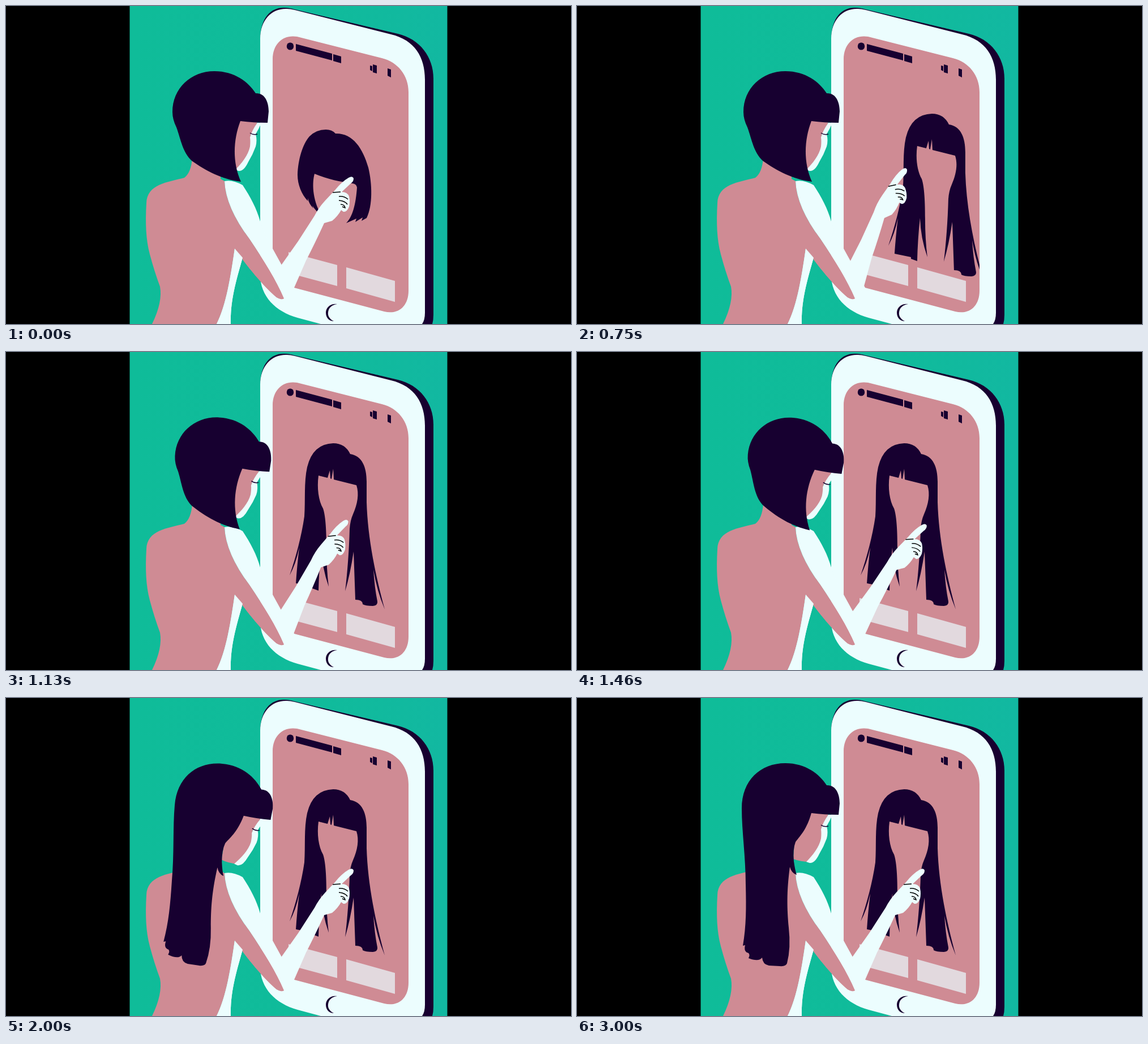
These frames come from a looping animation (998 px wide and 561 px high, 3180 ms). An HTML page with a canvas:

```html
<!DOCTYPE html>
<html lang="en">
<head>
<meta charset="utf-8">
<title>Trying on hair</title>
<style>
html, body { margin: 0; width: 100%; height: 100%; overflow: hidden; background: #000; }
canvas { display: block; }
</style>
</head>
<body>
<canvas id="c" width="998" height="561"></canvas>
<script>
const ctx = document.getElementById('c').getContext('2d');
const LOOP = 3180, FPS = 24;
const INK = '#170030', WHITE = '#ecfdfe', PINK = '#cf8b94', PALE = '#e2d9de';
const P = d => new Path2D(d);

const phoneSide = P(`M449 58 C450 20 468 2 492 3 Q500 3 510 6 L692 49
  C731 58 755 90 755 128 V545 Q755 554 753 561 H700 L449 400Z`);
const phoneFace = P(`M449 58 C449 24 470 4 496 5 Q502 5 510 7 L680 50
  C722 60 740 90 740 130 V541 Q740 554 735 561 H556 L515 550
  C476 539 449 512 449 474Z`);
const screen = P(`M471 94 C471 66 490 50 514 54 L664 92
  C692 99 711 122 711 152 V502 C711 530 693 545 668 539 L509 497
  Q471 486 471 452Z`);
const status = P(`M512 67 L576 84 V96 L512 79Z M578 85 L592 89 V101 L578 97Z
  M643 105 L647 106 V115 L643 113Z M648 103 L655 105 V119 L648 117Z
  M674 110 L680 112 V126 L674 123Z`);
const buttons = P(`M499 434 L585 457 V494 L499 471Z M601 461 L687 485 V522 L601 498Z`);
const home = P(`M585 526 C573 524 565 532 565 541 C565 550 571 556 579 556
  C571 552 568 546 569 540 C570 532 576 527 585 526Z`);

const screenBob = P(`M565 218 Q576 218 582 225 C612 224 630 250 640 285
  C647 314 648 352 637 374 L628 379 L630 373 L617 381 L619 375 L601 383
  C612 372 618 350 620 320 Q619 314 612 313 C590 310 570 306 545 296
  C541 310 540 340 557 369 Q548 363 541 352 L543 357 Q535 349 533 339 V344
  C522 332 515 315 515 298 C516 270 524 244 536 230 Q548 218 565 218Z`);
const screenLong = P(`M578 161 Q599 161 608 180 C629 183 637 203 637 229
  L637 265 C639 330 653 395 669 454 Q655 421 649 384
  Q651 415 656 440 Q657 447 648 448 Q635 448 630 445 Q630 437 617 437
  L614 352 Q608 392 599 422 C603 390 606 350 607 312 Q608 297 613 286
  C621 268 624 250 619 235 L579 225 L578 206 L575 224 L573 223 L572 209
  L568 222 L552 218 C549 240 552 262 560 276 C565 290 566 320 566 346
  Q566 382 570 414 Q558 380 557 345 Q553 382 552 421 L541 417 V414 L512 408
  Q514 378 518 345 Q512 374 501 394 C512 362 522 325 527 290
  C529 262 526 230 532 203 Q542 162 578 161Z`);

const armShade = 'C477 483 456 450 430 411 Q388 355 386 309';
const body = P(`M329 268 Q327 294 315 303 C285 311 249 314 248 348
  C246 382 247 412 254 438 Q262 468 272 495 Q277 522 258 561 H372
  C389 528 397 476 404 428 C425 458 455 495 478 514 Q486 519 491 516
  ${armShade} L379 305 V268Z`);
const side = P('M404 428 L418 444 C406 486 396 520 397 561 H372 C389 528 397 476 404 428Z');
const upperArm = P(`M386 309 Q400 306 418 316 C432 337 443 358 449 380
  Q458 407 471 428 L487 457 L509 497 L491 517 ${armShade}Z`);

const face = P('M414 195 H448 L440 215 L432 228 L433 244 L429 260 L412 289 Q395 289 382 284 L385 240Z');
const profile = P(`M444 206 H451 Q447 216 441 226 Q444 237 441 248
  Q436 262 428 275 Q420 292 411 291 L405 289
  C416 278 428 263 431 248 Q432 238 431 232 Q434 220 444 206Z`);
const lash = P('M431 224 Q437 228 444 226');
const fringe = 'M368 115 C404 115 428 134 441 154 C457 153 464 169 464 186 L462 206 Q437 206 414 203';
const headBob = P(fringe + ` C401 237 400 276 415 310 C382 306 353 291 328 273
  C312 258 309 236 301 214 Q294 200 294 187 C294 145 327 115 368 115Z`);
const headLong = P(fringe + ` C406 231 396 241 386 254 Q381 267 383 288 Q385 303 388 312
  Q379 309 376 298 C370 342 371 372 374 405 Q378 441 371 468 Q369 474 358 473
  L339 472 Q328 470 327 458 Q321 466 303 459 Q306 453 303 450 Q294 448 297 436
  L293 437 C299 402 299 370 298 330 C298 280 291 235 291 195 C291 145 324 115 368 115Z`);

const forearm = P(`M474 476 L487 456 L516 415 L545 370 Q552 356 564 343 L581 325
  Q593 310 605 303 Q612 299 614 304 Q614 310 609 313 L593 328 Q603 328 606 336
  Q608 345 606 354 Q602 364 596 363 L592 360 Q586 371 576 379 Q569 381 562 383
  Q546 418 530 449 L509 497 L492 517Z`);
const knuckles = P(`M577 329 L591 328 M588 336 Q597 335 604 341
  M588 343 Q599 344 603 350 M591 350 Q598 350 599 356 L594 354`);

const fill = (path, color) => { ctx.fillStyle = color; ctx.fill(path); };
const clamp = x => Math.min(1, Math.max(0, x));
const span = (t, a, b) => clamp((t - a) / (b - a));
const sine = x => (1 - Math.cos(Math.PI * x)) / 2;
const quad = x => x < .5 ? 2 * x * x : 1 - 2 * (1 - x) ** 2;
const cubic = x => x < .5 ? 4 * x ** 3 : 1 - 4 * (1 - x) ** 3;

// forearm angle in degrees: [time, angle]
const swing = [[70, 0], [590, 5.5], [785, -9.6], [1130, -2.5], [1460, 1.1], [1640, 4.4], [2000, 0]];

function slope(i) {
  if (i <= 0 || i >= swing.length - 1) return 0;
  const [a, b, c] = [swing[i - 1], swing[i], swing[i + 1]];
  if ((b[1] - a[1]) * (c[1] - b[1]) <= 0) return 0;
  return (c[1] - a[1]) / (c[0] - a[0]);
}

function armAngle(t) {
  const i = swing.findIndex(k => k[0] > t);
  if (i <= 0) return 0;
  const [t0, v0] = swing[i - 1], [t1, v1] = swing[i];
  const d = t1 - t0, u = (t - t0) / d, w = 1 - u;
  return v0 * w * w * (1 + 2 * u) + v1 * u * u * (3 - 2 * u)
    + slope(i - 1) * d * u * w * w - slope(i) * d * u * u * w;
}

function turned(x, y, angle, draw) {
  ctx.save();
  ctx.translate(x, y);
  ctx.rotate(angle);
  ctx.translate(-x, -y);
  draw();
  ctx.restore();
}

function shifted(path, x, y) {
  ctx.save();
  ctx.translate(x, y);
  fill(path, INK);
  ctx.restore();
}

const green = ctx.createLinearGradient(219, 0, 779, 0);
green.addColorStop(0, '#0fbc99');
green.addColorStop(.6, '#10bb9b');
green.addColorStop(1, '#12b8a1');

function drawPhone(t) {
  fill(phoneSide, INK);
  fill(phoneFace, WHITE);
  fill(screen, PINK);
  fill(status, INK);
  ctx.beginPath();
  ctx.ellipse(502, 71, 6.2, 6.6, 0, 0, 7);
  ctx.fill();
  fill(buttons, PALE);
  fill(home, INK);

  const p = cubic(span(t, 590, 840)), dx = 262, dy = 155;
  ctx.save();
  ctx.clip(screen);
  if (p < 1) shifted(screenBob, -dx * p, -dy * p);
  if (p > 0) shifted(screenLong, dx * (1 - p), dy * (1 - p));
  ctx.restore();
}

function drawWoman(t) {
  fill(body, PINK);
  fill(side, WHITE);
  fill(upperArm, WHITE);

  const tilt = quad(span(t, 820, 1380)) - sine(span(t, 2260, 3010));
  turned(364, 270, tilt * .09, () => {
    fill(face, PINK);
    fill(profile, WHITE);
    ctx.strokeStyle = INK;
    ctx.lineWidth = 1.5;
    ctx.stroke(lash);
    fill(t < 1490 ? headBob : headLong, INK);
  });

  turned(490, 510, armAngle(t) * Math.PI / 180, () => {
    fill(forearm, WHITE);
    ctx.lineWidth = 1.5;
    ctx.stroke(knuckles);
  });
  // shaded back of the arm stays in front of the elbow
  ctx.save();
  ctx.beginPath();
  ctx.rect(404, 400, 90, 125);
  ctx.clip();
  fill(body, PINK);
  ctx.restore();
  fill(side, WHITE);
}

function frame(now) {
  // stepped like film, with a little slack for rounding
  const t = Math.floor(now % LOOP * FPS / 1000 + .1) * 1000 / FPS;
  ctx.fillStyle = '#000';
  ctx.fillRect(0, 0, 998, 561);
  ctx.save();
  ctx.beginPath();
  ctx.rect(218.5, 0, 561, 561);
  ctx.clip();
  ctx.fillStyle = green;
  ctx.fillRect(218, 0, 562, 561);
  drawPhone(t);
  drawWoman(t);
  ctx.restore();
}

const start = performance.now();
function tick() {
  frame(performance.now() - start);
  requestAnimationFrame(tick);
}
tick();
</script>
</body>
</html>
```
